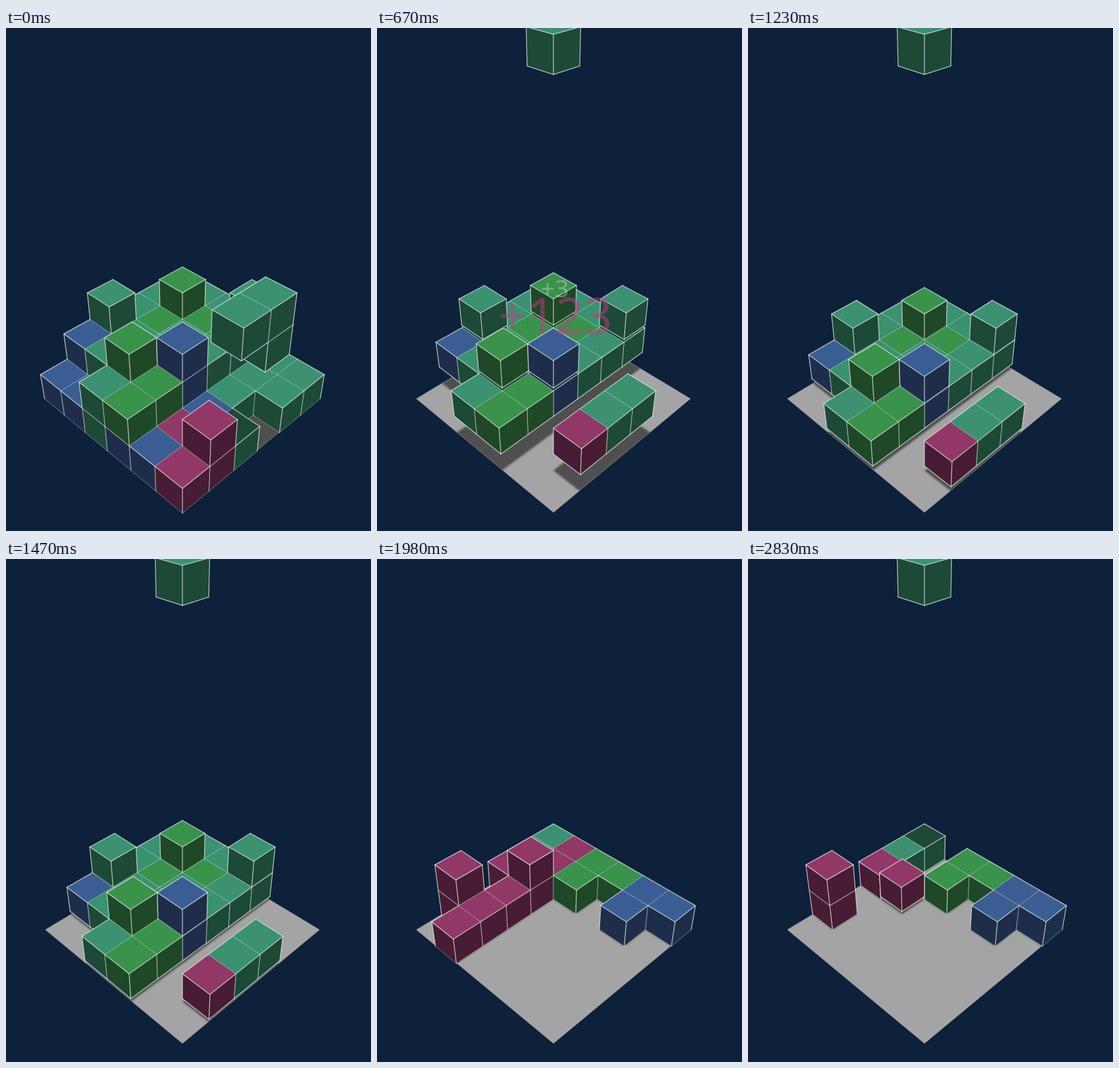
These frames come from a looping animation (571x786 px, 2880 ms). An HTML page with a canvas:

```html
<!DOCTYPE html>
<html lang="en">
<head>
<meta charset="utf-8">
<title>Falling blocks</title>
<style>
  html, body { margin: 0; width: 100%; height: 100%; overflow: hidden; background: #0d213b; }
  canvas { display: block; }
</style>
</head>
<body>
<canvas id="stage" width="571" height="786"></canvas>
<script>
const ctx = document.getElementById('stage').getContext('2d');
const LOOP = 2880, SIZE = 6;
const CUT = 1600;

// Moments at which the picture is refreshed.
const TICKS = [
  0, 100, 150, 200, 260, 330, 380, 430, 480, 540, 610,
  670, 720, 770, 810, 860, 910, 960, 1000, 1040, 1090, 1140, 1180,
  1230, 1270, 1320, 1370, 1420, 1480, 1540, 1600, 1670, 1750,
  1850, 1910, 1980, 2080, 2130, 2180, 2230,
  2380, 2420, 2460, 2510, 2560, 2600, 2650, 2700, 2740, 2790, 2830
];

// [lit top, unlit face]
const COLORS = {
  t: ['#3a9271', '#1d4937'],
  g: ['#39934b', '#1e4826'],
  b: ['#3a5e93', '#1e2e4a'],
  m: ['#923867', '#481c33']
};

// One string per x row, one character per y cell.
const layer = (h, rows) => rows.flatMap((row, x) =>
  [...row].flatMap((c, y) => COLORS[c] ? [{ x, y, h, c }] : []));
const piece = (c, cells) => cells.map(([x, y, h]) => ({ x, y, h, c }));
const lift = (cubes, dh) => cubes.map(q => ({ ...q, h: q.h + dh }));

const SPAWN = piece('t', [[0, 0, 8.98]]);

const fullLayer = layer(0, ['tttttb', 'tttttb', 'tttttt', 'tttbbb', 'tttbmb', 'tt.tmm']);
const upper = [
  ...layer(1, ['ttttb.', 'tggtt.', 'tgtttt', 'tttbgg', '......', '....m.']),
  ...layer(2, ['...t..', '.g....', '....g.', 't..b..'])
];
const hook = piece('t', [[5, 3, 1], [5, 2, 1], [5, 2, 0]]);

const sparse = layer(0, ['ttm...', 'mmmm..', 'gg....', 'g.....', 'bb....', 'b.....']);
const raised = piece('m', [[1, 2, 1]]);
const corner = piece('m', [[1, 5, 0], [1, 4, 0], [0, 4, 0], [0, 4, 1]]);

const fallHeight = (t, from, start) => Math.max(0, from - (t - start) / 73);
const settle = (t, start, rate) => Math.exp(-rate * Math.max(0, t - start)) - 1;

function firstScene(t) {
  if (t < 330) return [...fullLayer, ...upper, ...lift(hook, fallHeight(t, 3, 0))];
  // Lower cubes leave a little earlier than the ones they carry.
  const left = [...upper, ...hook].filter(q => q.h > 0)
    .map(q => ({ ...q, h: q.h + settle(t, 440 + 62 * q.h, 0.00234) }));
  return [...left, ...SPAWN];
}

function secondScene(t) {
  const cubes = [...sparse, ...lift(corner, fallHeight(t, 4, 1670))];
  if (t < 2080) return [...cubes, ...raised];
  return [...cubes.filter(q => q.x !== 1),
    ...lift(raised, settle(t, 2330, 0.0044)), ...SPAWN];
}

function project([x, y, h]) {
  const s = x + y, w = 1 - 0.0229 * s - 0.025 * h;
  return [276 + 31 * (x - y) / w, 0.5 + (449 + 8.37 * s - 46 * h) / w];
}

function trace(points) {
  ctx.beginPath();
  points.forEach(p => ctx.lineTo(...project(p)));
}

function fill(points, color) {
  trace(points);
  ctx.closePath();
  ctx.fillStyle = color;
  ctx.fill();
}

function edge(a, b, inner) {
  trace([a, b]);
  ctx.strokeStyle = inner ? 'rgba(190,212,204,.5)' : 'rgba(218,226,222,.82)';
  ctx.lineWidth = inner ? 1 : 1.25;
  ctx.stroke();
}

function square(x, y, h, size = 1) {
  return [[x, y, h], [x + size, y, h], [x + size, y + size, h], [x, y + size, h]];
}

function drawFloor(cubes) {
  const area = square(0.012, 0.012, 0, SIZE - 0.024);
  fill(area, '#a4a4a4');
  ctx.save();
  trace(area);
  ctx.clip();
  ctx.filter = 'blur(1.5px)';
  ctx.beginPath();
  const cells = new Set(cubes.map(q => q.x * SIZE + q.y));
  for (const cell of cells) {
    const points = square(Math.floor(cell / SIZE), cell % SIZE, 0).map(project);
    ctx.moveTo(...points[0]);
    points.slice(1).forEach(p => ctx.lineTo(...p));
    ctx.closePath();
  }
  ctx.fillStyle = '#4f4f4f';
  ctx.fill();
  ctx.restore();
}

function drawCube({ x, y, h, c }, cubes) {
  const has = (dx, dy, dh) => cubes.some(q =>
    q.x === x + dx && q.y === y + dy && Math.abs(q.h - h - dh) < 0.05);
  const shaded = cubes.some(q => q.x === x && q.y === y && q.h > h + 0.5);
  const [lit, dark] = COLORS[c];
  const [back, right, front, left] = square(x, y, h + 1);
  const [, rightLow, frontLow, leftLow] = square(x, y, h);

  fill([left, front, frontLow, leftLow], dark);
  fill([right, front, frontLow, rightLow], dark);
  fill([back, right, front, left], shaded ? dark : lit);

  const below = has(0, 0, -1), nearX = has(-1, 0, 0), nearY = has(0, -1, 0);
  edge(leftLow, frontLow, below || h < 0.02);
  edge(frontLow, rightLow, below || h < 0.02);
  edge(left, leftLow, nearX);
  edge(right, rightLow, nearY);
  edge(front, frontLow, false);
  edge(back, left, nearX);
  edge(back, right, nearY);
  edge(left, front, has(0, 1, 0));
  edge(right, front, has(1, 0, 0));
}

function label(text, size, color, x, y, alpha) {
  ctx.globalAlpha = Math.max(0, Math.min(1, alpha));
  ctx.textAlign = 'center';
  ctx.font = `${size}px "Noto Sans", "Open Sans", sans-serif`;
  ctx.fillStyle = color;
  ctx.fillText(text, x, y);
  ctx.globalAlpha = 1;
}

function drawScore(age, points, lines) {
  if (age < 0) return;
  const rise = (age - 100) * 0.238;
  label('+' + lines, 39, '#e9ecec', 278, 478 - rise, (480 - age) / 400);
  label('+' + points, 78, '#c53688', 279, 535.5 - rise, (590 - age) / 500);
}

function draw(t) {
  const cubes = t < CUT ? firstScene(t) : secondScene(t);
  ctx.fillStyle = '#0d213b';
  ctx.fillRect(0, 0, 571, 786);
  drawFloor(cubes);
  const depth = q => q.x + q.y + q.h;
  cubes.sort((p, q) => depth(p) - depth(q)).forEach(q => drawCube(q, cubes));
  if (t < CUT) drawScore(t - 330, 123, 3);
  else drawScore(t - 2080, 6, 1);
}

ctx.lineJoin = ctx.lineCap = 'round';
const start = performance.now();
function frame() {
  const t = (performance.now() - start) % LOOP;
  draw(TICKS.findLast(tick => tick <= t));
  requestAnimationFrame(frame);
}
frame();
</script>
</body>
</html>
```
